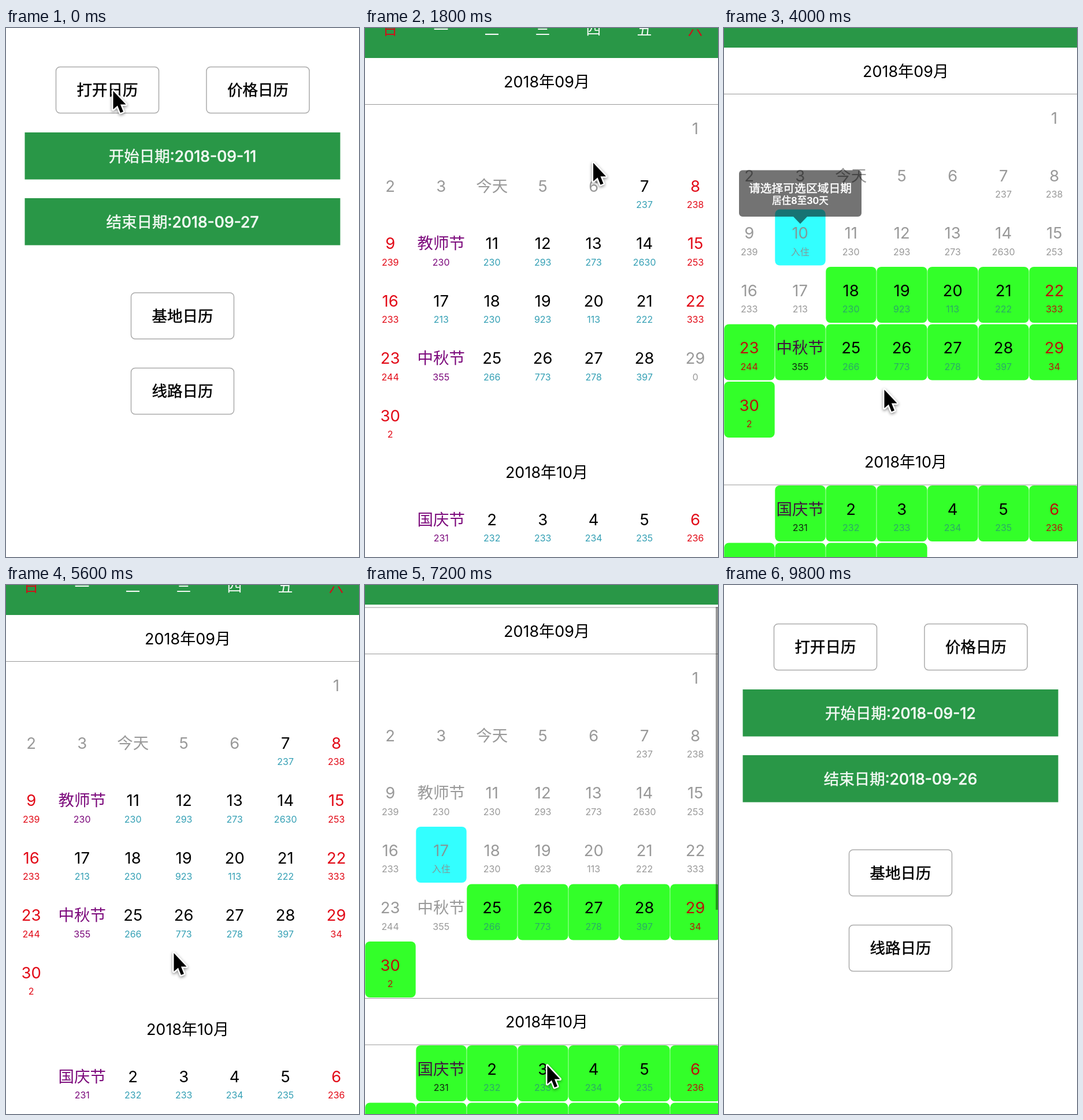
Recreate the animation shown at these times as an HTML page with a canvas. Size 611 by 917 pixels, loop 10000 ms.

```html
<!DOCTYPE html>
<html lang="zh">
<head>
<meta charset="utf-8">
<style>
  html, body { margin: 0; width: 100%; height: 100%; overflow: hidden; background: #fff; }
  canvas { display: block; }
</style>
</head>
<body>
<canvas id="stage" width="611" height="917"></canvas>
<script>
const ctx = document.getElementById('stage').getContext('2d');
const LOOP = 10000, STEP = 200;
const COL = 88, ROW = 99.5, TITLE = 81;
const GREEN = '#299747', GREY = '#999', RED = '#e20a17', TEAL = '#35a0b5', PURPLE = '#7c0a7c';

const WEEK = '日一二三四五六';
const FESTIVALS = { 4: '今天', 10: '教师节', 24: '中秋节', 31: '国庆节' };
const SEPTEMBER = [237, 238, 239, 230, 230, 293, 273, 2630, 253, 233, 213, 230,
  923, 113, 222, 333, 244, 355, 266, 773, 278, 397, 34, 2];
// "before" is the number of days counted ahead of the month
const MONTHS = [
  { title: '2018年09月', first: 6, days: 30, before: 0 },
  { title: '2018年10月', first: 1, days: 31, before: 30 },
  { title: '2018年11月', first: 4, days: 30, before: 61 }
];

const home = (start, end) => () => drawHome(start, end);
const calendar = options => () => drawCalendar({ head: 34, top: 34, prices: true, ...options });
const fresh = { head: 52, top: 52, week: true };

const scenes = [
  [0, home(11, 27)],
  [200, calendar({ ...fresh, prices: false })],
  [400, calendar({ ...fresh, prices: false, pick: 11, last: 11 })],
  [600, calendar({ ...fresh, prices: false, pick: 11, last: 20 })],
  [1000, home(11, 20)],
  [1600, calendar({ ...fresh, soldOut: 29 })],
  [2000, calendar({ top: -120, week: true, soldOut: 29, bar: 338 })],
  [2400, calendar({ week: true, soldOut: 29, bar: 338 })],
  [2600, calendar({ top: 83, week: true, soldOut: 29, bar: 338 })],
  [2800, calendar({ ...fresh, soldOut: 29 })],
  [3000, home(11, 20)],
  [3400, calendar({})],
  [3800, calendar({ pick: 10, tip: true })],
  [4400, calendar({ pick: 10 })],
  [4800, calendar({ pick: 10, last: 22 })],
  [5000, home(10, 22)],
  [5400, calendar(fresh)],
  [6000, calendar({})],
  [6400, calendar({ pick: 17, tip: true })],
  [7000, calendar({ pick: 17 })],
  [7200, calendar({ top: 39, pick: 17, bar: 525 })],
  [7400, calendar({ pick: 17 })],
  [7800, calendar({ pick: 17, last: 28 })],
  [8000, home(17, 28)],
  [8400, calendar(fresh)],
  [8800, calendar({ pick: 12, tip: true })],
  [9200, calendar({ pick: 12, last: 26 })],
  [9400, home(12, 26)]
];

const cursorPath = [
  [0, 185, 109], [400, 220, 380], [600, 395, 480], [1000, 470, 548], [1400, 435, 112],
  [1600, 430, 130], [2600, 253, 649], [3200, 290, 500], [3800, 200, 440], [4000, 277, 627],
  [4800, 570, 470], [5200, 290, 638], [5800, 290, 638], [6400, 135, 460], [7200, 315, 833],
  [7800, 480, 570], [8200, 300, 630], [8800, 310, 370], [9200, 310, 570], [9600, 302, 598]
];

function text(string, x, y, size, color, weight = 400) {
  ctx.font = `${weight} ${size}px Inter, "Noto Sans CJK SC", "Noto Sans CJK", sans-serif`;
  ctx.textAlign = 'center';
  ctx.fillStyle = ctx.strokeStyle = color;
  ctx.fillText(string, x, y + size * 0.363);
  // a thin outline gives the Chinese glyphs a medium weight
  if (weight > 400) {
    ctx.lineWidth = 0.5;
    ctx.strokeText(string, x, y + size * 0.363);
  }
}

function rect(x, y, w, h, color) {
  ctx.fillStyle = color;
  ctx.fillRect(x, y, w, h);
}

function rounded(x, y, w, h, r) {
  ctx.beginPath();
  ctx.roundRect(x, y, w, h, r);
}

function button(label, x, y) {
  rounded(x, y, 178, 80, 7);
  ctx.strokeStyle = '#aaa';
  ctx.lineWidth = 1.5;
  ctx.stroke();
  text(label, x + 89, y + 40, 26.5, '#000', 500);
}

function banner(label, day, y) {
  rect(32.5, y, 546, 81.5, GREEN);
  text(`${label}:2018-09-${day}`, 305.5, y + 41, 26.5, '#f3f9f4', 500);
}

function drawHome(start, end) {
  button('打开日历', 86.5, 67.5);
  button('价格日历', 347, 67.5);
  banner('开始日期', start, 181);
  banner('结束日期', end, 295);
  button('基地日历', 216.5, 459);
  button('线路日历', 216.5, 589.5);
}

function drawDay(o, month, day, x, y, column) {
  const index = month.before + day;
  const festival = FESTIVALS[index];
  const weekend = column === 0 || column === 6;
  const inRange = index === o.pick || (index > o.pick && index <= o.last);
  const open = o.pick && !o.last && index >= o.pick + 8 && index <= o.pick + 30;
  const disabled = o.pick && !o.last ? !open : index < 7 || index === o.soldOut;

  if (inRange || open) {
    rounded(x + 0.3, y, 87.4, 97, 8);
    ctx.fillStyle = inRange ? '#33ffff' : '#33ff29';
    ctx.fill();
  }
  let color = '#000', priceColor = TEAL;
  if (disabled) color = priceColor = inRange ? '#7f9a9a' : GREY;
  else if (festival) {
    color = open ? '#401540' : PURPLE;
    priceColor = open ? '#102810' : PURPLE;
  } else if (weekend) color = priceColor = open ? '#b9150b' : RED;
  else if (open) priceColor = '#2aaa68';

  const center = x + 43.7;
  text(festival && index !== o.pick ? festival : day, center, y + 41, 27.5, color);
  let note = '';
  if (index === o.pick) note = '入住';
  else if (index === o.last) note = '离开';
  else if (o.prices && index >= 7) {
    note = index === o.soldOut ? 0 : month.before ? 230 + day : SEPTEMBER[day - 7];
  }
  text(note, center, y + 73.5, 16, priceColor);
}

function drawTip(x, y) {
  ctx.fillStyle = 'rgba(0,0,0,.55)';
  rounded(x - 106, y - 68, 212, 80.5, 6);
  ctx.moveTo(x - 12, y + 12.5);
  ctx.lineTo(x + 12, y + 12.5);
  ctx.lineTo(x, y + 25);
  ctx.fill();
  text('请选择可选区域日期', x, y - 37, 19.8, '#fff', 500);
  text('居住8至30天', x, y - 15, 16.5, '#fff', 500);
}

function drawCalendar(o) {
  let top = o.top, tip;
  for (const [n, month] of MONTHS.entries()) {
    const rows = Math.ceil((month.first + month.days) / 7);
    for (let day = 1; day <= month.days; day++) {
      const cell = month.first + day - 1, column = cell % 7;
      const x = column * COL, y = top + TITLE + 0.5 + Math.floor(cell / 7) * ROW;
      drawDay(o, month, day, x, y, column);
      if (o.tip && month.before + day === o.pick) tip = [x + 44, y];
    }
    const bottom = top + TITLE + rows * ROW - 0.5;
    const titleY = Math.min(Math.max(top, o.head), bottom - TITLE);
    rect(0, titleY, 611, TITLE - 1, '#fff');
    if (o.bar) rect(0, titleY - 0.5, 611, 1, '#999');
    if (n === 0 || o.pick) rect(0, titleY + TITLE - 1, 611, 1, '#999');
    text(month.title, 314.5, titleY + 41, 27, '#000');
    top = bottom;
  }
  if (tip) drawTip(...tip);
  if (o.bar) rect(607, 38, 4, o.bar, 'rgba(0,0,0,.4)');
  rect(0, 0, 611, o.head, GREEN);
  if (o.week) [...WEEK].forEach((name, i) =>
    text(name, i * COL + 43.5, 3, 26, i % 6 ? '#f3f9f4' : '#cf1119'));
}

function drawCursor(t) {
  if (t >= 9800) return;
  const next = cursorPath.findIndex(p => p[0] > t);
  const b = cursorPath.at(next), a = next < 0 ? b : cursorPath[next - 1];
  const k = a === b ? 0 : (t - a[0]) / (b[0] - a[0]);
  ctx.save();
  ctx.translate(a[1] + (b[1] - a[1]) * k, a[2] + (b[2] - a[2]) * k);
  const arrow = new Path2D('M0.5 0V32L8 25.5L13 38L18 36L13 23.5H22.5Z');
  ctx.lineWidth = 5;
  ctx.lineJoin = 'round';
  ctx.strokeStyle = '#fff';
  ctx.shadowColor = 'rgba(0,0,0,.45)';
  ctx.shadowBlur = 5;
  ctx.shadowOffsetY = 2;
  ctx.stroke(arrow);
  ctx.shadowColor = 'transparent';
  ctx.fillStyle = '#000';
  ctx.fill(arrow);
  ctx.restore();
}

function frame(now) {
  const t = Math.floor((now % LOOP) / STEP) * STEP;
  rect(0, 0, 611, 917, '#fff');
  scenes.findLast(scene => scene[0] <= t)[1]();
  drawCursor(t);
  requestAnimationFrame(frame);
}
frame(0);
</script>
</body>
</html>
```
